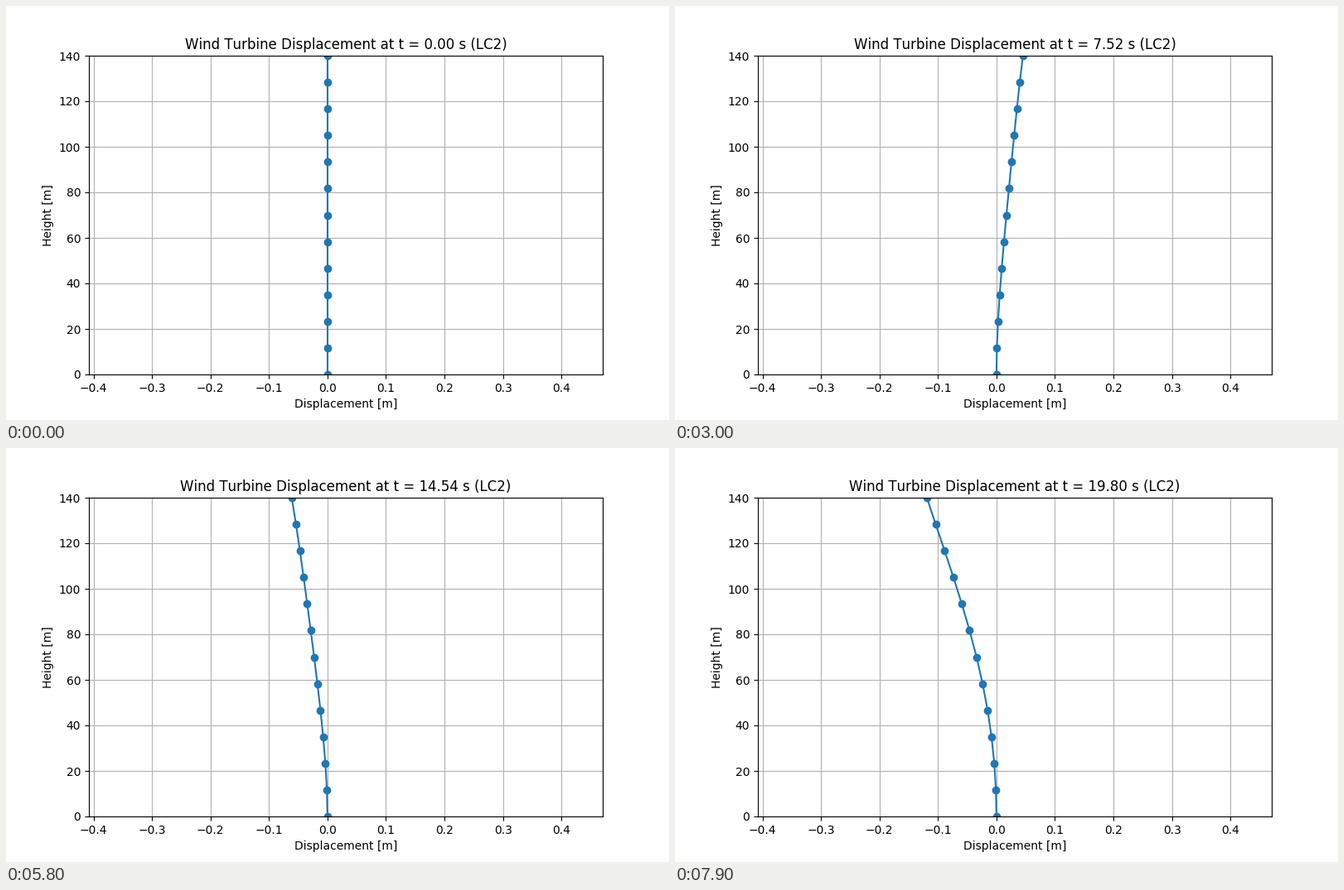
Write a matplotlib script that moves like this. It is 800 px wide and 500 px high and loops after 8000 ms.

```python
import numpy as np
import matplotlib.pyplot as plt
from matplotlib.animation import FuncAnimation

FRAMES, INTERVAL = 80, 100
DT = 100 / 399          # simulated seconds per frame

# Turning points of the tower top: frame, displacement in mm
TURN_AT = [0, 8.5, 16.5, 25.5, 32, 46, 53, 61.5, 70, 79]
TURN_MM = [0, -36, 45, -41, 69, -48, 51, -125, 100, -119]

height = np.linspace(0, 140, 13)
z = height / 140
bend_shape = (3 * z**2 - z**3) / 2
bulge_shape = 16 * z**2 * (1 - z) ** 2


def sway(i):
    """Swing between turning points with cosine easing."""
    k = np.interp(i, TURN_AT, range(len(TURN_AT)))
    n = np.floor(k)
    eased = n + (1 - np.cos(np.pi * (k - n))) / 2
    return np.interp(eased, range(len(TURN_MM)), TURN_MM)


def bulge(i):
    """Slow second-mode bulge in mm, growing from rest."""
    return -min(1, i / 10) * (1 + 4.6 * np.cos(2 * np.pi * (i - 50.5) / 50))


plt.rcParams["font.family"] = "DejaVu Sans"
plt.rcParams["text.kerning_factor"] = 6     # plain advance widths
fig, ax = plt.subplots(figsize=(8, 5), dpi=100)
line, = ax.plot(np.zeros_like(z), height, "o-", color="#1f77b4")
ax.set_xlim(-0.4079, 0.4706)
ax.set_ylim(0, 140)
ax.set_xlabel("Displacement [m]")
ax.set_ylabel("Height [m]")
ax.grid(True)
title = ax.set_title("")


def update(i):
    line.set_xdata((sway(i) * bend_shape + bulge(i) * bulge_shape) / 1000)
    title.set_text(f"Wind Turbine Displacement at t = {i * DT:.2f} s (LC2)")
    return line, title


anim = FuncAnimation(fig, update, frames=FRAMES, interval=INTERVAL,
                     repeat=True, repeat_delay=0, blit=False)
plt.show()
```
